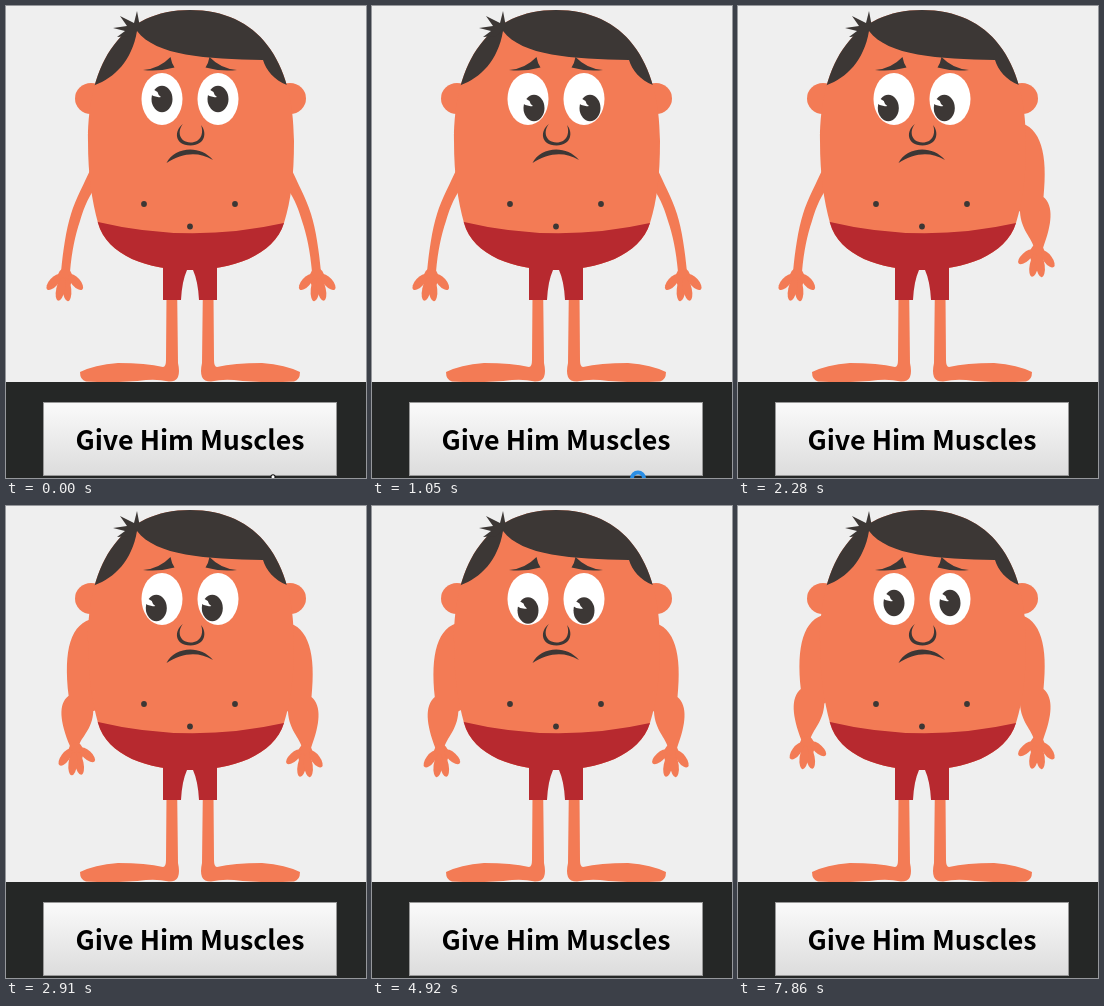
Animation, 360 px wide and 472 px high, one loop 8 s. Source, as an HTML page with a canvas:

```html
<!DOCTYPE html>
<html lang="en">
<head>
<meta charset="utf-8">
<title>Give Him Muscles</title>
<style>
  html, body { margin: 0; width: 100%; height: 100%; overflow: hidden; background: #efefef; }
  canvas { display: block; width: 360px; height: 472px; }
</style>
</head>
<body>
<canvas id="stage" width="360" height="472"></canvas>
<script>
const ctx = document.getElementById('stage').getContext('2d');
const LOOP = 8000;
const SKIN = '#f37b55', DARK = '#3c3735', RED = '#b7292f', FLOOR = '#252726';
const FONT = '700 26.8px "Noto Sans CJK SC", "Noto Sans CJK JP", "Noto Sans CJK KR", "Noto Sans CJK", "Noto Sans", sans-serif';

const BODY = new Path2D('M82 135C82 54 117 4 184 4C252 4 288 54 288 135C288 170 285 195 278 217' +
  'C268 250 225 264 184 264C143 264 101 250 92 217C86 195 82 170 82 135Z');
const HAIR = new Path2D('M80 82L89 79C108 72 126 55 131 25C150 50 200 53 257 54C260 64 268 74 281 79L300 79V0H80Z');
const TUFT = new Path2D('M131 5L128 17L114 10L121 20L107 22L119 25L111 31L124 30L134 21Z');
const SHORTS = new Path2D('M80 212L92 216Q184 238 278 217L290 214V270H80Z');
const SHORT_LEGS = new Path2D('M157 255V294H175Q176 275 181 264H187Q192 275 193 294H211V255Z');
const LEG = new Path2D('M160.5 290H171.2L172 357Q174 366 172 371Q170 375.5 163 375.5Q152 373 140 374Q115 377 80 375.5' +
  'Q74 374 74 366Q88 359 112 357Q140 357 157 361Q160 361 160 354Z');
const BROW = new Path2D('M137 64Q153 63 164.5 51Q165.5 57 168.5 61.5Q152 66 137 64Z');
const NOSE = new Path2D('M177 118C168 124 168 139.5 184.5 139.5C200 139 201 126 195 119' +
  'C198 127 195 136.5 184.5 136.5C173 136 171 125 177 118Z');
const MOUTH = new Path2D('M160.5 157C168 141 194 138 207 154C192 145 176 147 160.5 157Z');
const GLINT = new Path2D('M-1 -2Q-4 -4 -4.5 -7L-11 -11L-12 -5Q-7 -1 -1 -2Z');
const HAND_CURSOR = new Path2D('M-2 1.5Q0 -1 2 1.5V9Q4 7 6 9.5Q8 8 9.5 11Q12 9.5 12 13V17' +
  'Q12 20 10 23H0Q-2 19 -6 14Q-6 10 -2 13Z');

// Arm outline: x, y pairs for a start point, two curves, a line, two curves.
const THIN = [284,160, 292,178, 300,192, 305,208, 310,224, 313,245, 315,266,
  306,266, 304,244, 301,230, 296,215, 293,205, 290,195, 280,180];
const STRONG = [280,116, 303,121, 310,148, 305.5,191, 316,200, 314,218, 305,242,
  296,242, 294,232, 283,224, 282,206, 282,205, 280,204, 270,200];
const FINGERS = [[-17.5, 20], [-3, 31.5], [7, 31], [18, 20]];
const GROW = [0.2, 0.55, 0.9, 1.08, 1.03, 1];

// Pupil moves: start, end, number of steps, x, y.
const LOOKS = [
  [675, 975, 5, 6, 9],
  [1980, 2280, 5, -5.7, 9],
  [3360, 3690, 5, 0, 4],
  [4680, 4920, 4, 0, 11.5],
  [6450, 6690, 4, 0, 4]
];

const lerp = (a, b, p) => a + (b - a) * p;

// Number of steps taken, the first at start and the last at end.
function stepAt(t, start, end, n) {
  const k = Math.floor((t - start) * (n - 1) / (end - start) + 1e-6) + 1;
  return Math.max(0, Math.min(n, k));
}

function tween(t, start, end, n) {
  const p = stepAt(t, start, end, n) / n;
  return p * p * (3 - 2 * p);
}

function growth(t, start, end) {
  const k = stepAt(t, start, end, GROW.length);
  return k ? GROW[k - 1] : 0;
}

function fill(path, color) {
  ctx.fillStyle = color;
  ctx.fill(path);
}

function oval(x, y, rx, ry, color, turn = 0) {
  ctx.fillStyle = color;
  ctx.beginPath();
  ctx.ellipse(x, y, rx, ry, turn, 0, Math.PI * 2);
  ctx.fill();
}

function mirrored(sum, draw) {
  ctx.save();
  ctx.translate(sum, 0);
  ctx.scale(-1, 1);
  draw();
  ctx.restore();
}

function both(draw) {
  draw();
  mirrored(368, draw);
}

function drawArm(p, lift) {
  const q = THIN.map((v, i) => lerp(v, STRONG[i], p));
  const curve = i => ctx.bezierCurveTo(q[i], q[i + 1], q[i + 2], q[i + 3], q[i + 4], q[i + 5]);
  ctx.save();
  ctx.translate(0, -lift);
  ctx.fillStyle = SKIN;
  ctx.beginPath();
  ctx.moveTo(q[0], q[1]);
  curve(2);
  curve(8);
  ctx.lineTo(q[14], q[15]);
  curve(16);
  curve(22);
  ctx.closePath();
  ctx.fill();

  ctx.translate(lerp(311, 300, p), lerp(263, 239, p));
  ctx.rotate(0.1 * p);
  oval(0, 9, 7.5, 10, SKIN);
  for (const [x, y] of FINGERS) {
    oval(x * 0.62, y * 0.65, Math.hypot(x, y) * 0.37, 4.4, SKIN, Math.atan2(y, x));
  }
  ctx.restore();
}

function drawBody() {
  both(() => fill(LEG, SKIN));
  oval(85, 92.5, 16, 15.5, SKIN);
  oval(284, 92.5, 16, 15.5, SKIN);
  fill(BODY, SKIN);
  ctx.save();
  ctx.clip(BODY);
  fill(HAIR, DARK);
  fill(SHORTS, RED);
  ctx.restore();
  fill(SHORT_LEGS, RED);
  fill(TUFT, DARK);
  oval(138, 198, 2.9, 2.9, DARK);
  oval(229, 198, 2.9, 2.9, DARK);
  oval(184, 220.5, 2.9, 2.9, DARK);
}

function drawFace(t) {
  let x = 0, y = 0;
  for (const [start, end, n, toX, toY] of LOOKS) {
    const p = tween(t, start, end, n);
    x = lerp(x, toX, p);
    y = lerp(y, toY, p);
  }
  for (const cx of [156, 212]) {
    oval(cx, 93, 20.5, 26, '#fff');
    ctx.save();
    ctx.translate(cx + x, 93 + y);
    oval(0, 0, 10.5, 13.2, DARK);
    fill(GLINT, '#fff');
    ctx.restore();
  }
  both(() => fill(BROW, DARK));
  fill(NOSE, DARK);
  fill(MOUTH, DARK);
}

function drawButton(t) {
  const hover = t < 133 || t >= 825 ? 0 : t < 410 ? 0.85 : 1;
  const gray = p => `rgb(${Array(3).fill(Math.round(lerp(249, 220, p)))})`;
  const shade = ctx.createLinearGradient(0, 396, 0, 470);
  shade.addColorStop(0.05, gray(hover));
  shade.addColorStop(1, gray(1 - hover));
  ctx.fillStyle = shade;
  ctx.fillRect(37, 396, 294, 74);
  ctx.strokeStyle = '#989898';
  ctx.lineWidth = 1;
  ctx.strokeRect(37.5, 396.5, 293, 73);
  ctx.fillStyle = '#000';
  ctx.font = FONT;
  ctx.textAlign = 'center';
  ctx.textBaseline = 'alphabetic';
  ctx.fillText('Give Him Muscles', 184, 444);
}

function drawCursor(t) {
  if (t < 825) {
    const p = tween(t, 70, 260, 4) - tween(t, 600, 825, 4);
    ctx.save();
    ctx.translate(lerp(267, 239.5, p), lerp(468.5, 430, p));
    fill(HAND_CURSOR, '#fff');
    ctx.strokeStyle = '#111';
    ctx.lineWidth = 1.2;
    ctx.lineJoin = 'round';
    ctx.stroke(HAND_CURSOR);
    ctx.beginPath();
    for (const x of [2, 6, 9.5]) {
      ctx.moveTo(x, 9);
      ctx.lineTo(x, 13);
    }
    ctx.stroke();
    ctx.restore();
  } else if (t >= 1050 && t < 1140) {
    ctx.strokeStyle = '#2b8fe6';
    ctx.lineWidth = 4;
    ctx.beginPath();
    ctx.arc(266, 472.5, 6, 0, Math.PI * 2);
    ctx.stroke();
  }
}

function draw(t) {
  ctx.fillStyle = '#efefef';
  ctx.fillRect(0, 0, 360, 472);
  ctx.fillStyle = FLOOR;
  ctx.fillRect(0, 376, 360, 96);
  const lift = 8 * tween(t, 7620, 7860, 4);
  const right = growth(t, 1140, 1680);
  const left = growth(t, 2670, 3060);
  drawArm(right, lift);
  mirrored(370 - 1.7 * left, () => drawArm(left, lift));
  drawBody();
  drawFace(t);
  drawButton(t);
  drawCursor(t);
}

function tick() {
  draw(performance.now() % LOOP);
  requestAnimationFrame(tick);
}
tick();
</script>
</body>
</html>
```
